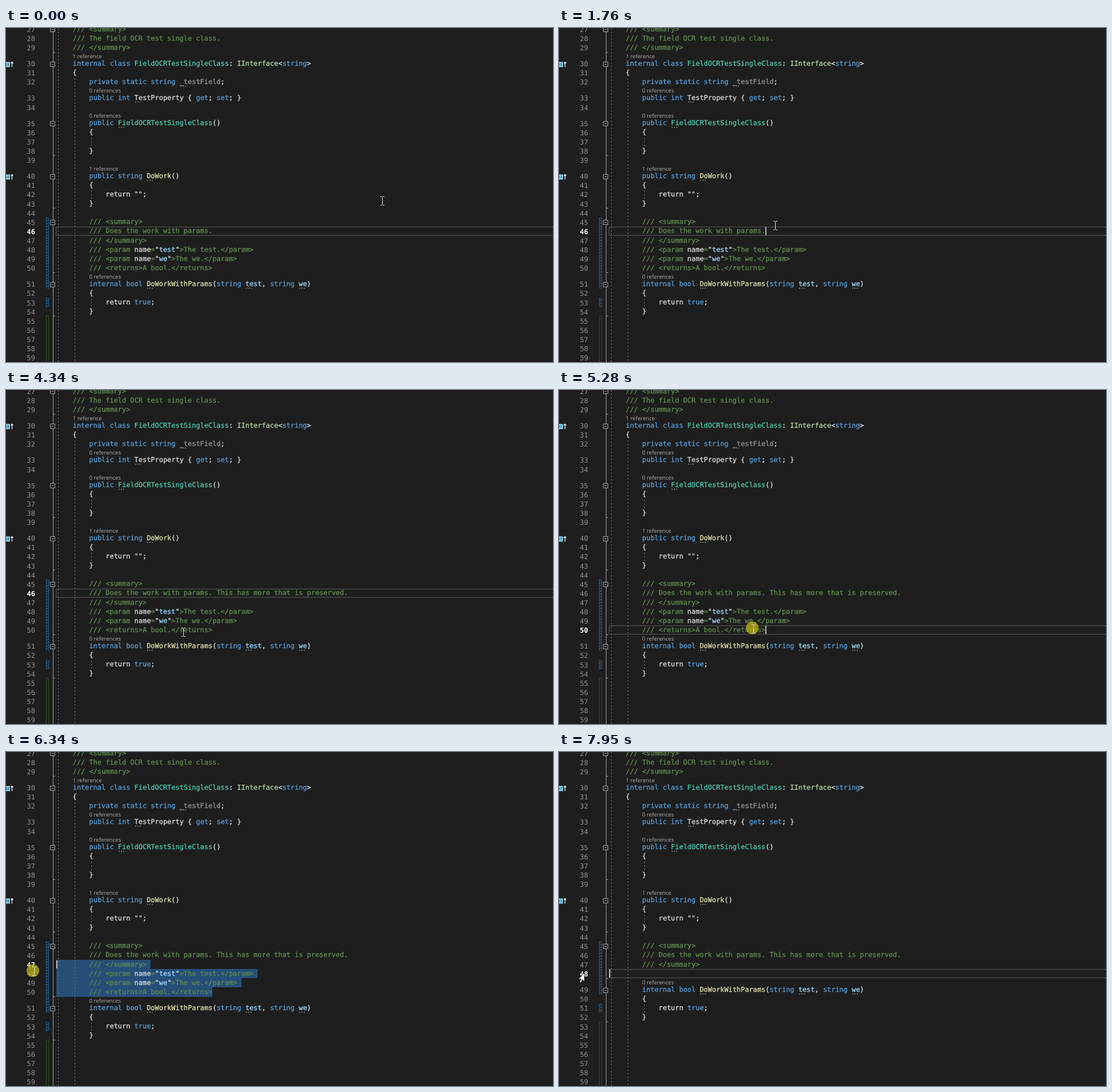
These frames come from a looping animation (957 by 585 pixels, 8000 ms). An HTML page:

```html
<!DOCTYPE html>
<html lang="en">
<head>
<meta charset="utf-8">
<title>Code editor</title>
<style>
  html, body { margin: 0; width: 100%; height: 100%; overflow: hidden; background: #1e1e1e; }
  svg { display: block; width: 100%; height: 100%; }
  text { white-space: pre; text-rendering: geometricPrecision; }
  .code, .num { font: 11.943px "DejaVu Sans Mono", "Liberation Mono", monospace; }
  .code tspan { fill: currentColor; stroke: currentColor; stroke-width: .3; }
  .num { fill: #929292; }
  .num.on { fill: #fff; font-weight: bold; }
  .lens { font: 9.6px "Noto Sans", "Open Sans", sans-serif; fill: #a4a4a4; }
  .p { color: #dcdcdc; }
  .k { color: #569cd6; }
  .t { color: #4ec9b0; }
  .i { color: #b8d7a3; }
  .m { color: #dcdcaa; }
  .v { color: #9cdcfe; }
  .f { color: #949494; }
  .s { color: #d8c5bb; }
  .d, .x { color: #608b4e; }
  .fold { fill: #1e1e1e; stroke: #a5a5a5; }
  .rail { fill: none; stroke: #a0a0a0; }
  .guide { fill: none; stroke: #6c6c6c; stroke-dasharray: 3 3; }
  .dots { fill: none; stroke: #a0a0a0; stroke-width: 1.5; stroke-dasharray: 1.6 2.4; }
  .added { fill: #1e1e1e; stroke: #28551d; }
</style>
</head>
<body>
<svg viewBox="0 0 957 585" preserveAspectRatio="none">
  <defs>
    <pattern id="hatch" x="70" width="5" height="5" patternUnits="userSpaceOnUse">
      <path stroke="#2a80c4" d="M0 5L5 0"/>
      <path stroke="#1d5f96" d="M.5 0V5M4.5 0V5"/>
    </pattern>
  </defs>
  <path id="sel" fill="#264f78" shape-rendering="crispEdges"/>
  <rect id="row" x="87.8" width="880" height="14.8" fill="none" stroke="#464646" stroke-width="1.5"/>
  <g id="pages"></g>
  <path id="caret" stroke="#f0f0f0" stroke-width="1.4"/>
  <circle id="press" r="11" fill="#b8ae12" fill-opacity=".78"/>
  <path id="beam" fill="none" stroke="#e4e4e4" d="M-3.5 -7.5H-.8M.8 -7.5H3.5M0 -7V7M-3.5 7.5H-.8M.8 7.5H3.5"/>
  <path id="arrow" fill="#fff" stroke="#111" stroke-width=".8" d="M0 0V15L3.6 11.8L6 17L8.4 16L6 10.8H10.6Z"/>
</svg>
<script>
const LOOP = 8000, X0 = 88, CW = 7.19, LH = 16.1, LENS = 12, FIRST = 27, LAST = 59;
const PASTE = 2810, DOWN = 5190, DRAG = 5320, UP = 7240, CUT = 7950, LAG = 85, BLINK = 520;
const $ = id => document.getElementById(id);

// Each line: indent, coloured text (~class, ^ = suggestion dots), flags, reference label.
// Flags: f fold box, e end tick, g inner guide, b changed, i interface glyph, n new lines start
const head = [
  [4, '~d/// <summary>', 'f'],
  [4, '~d/// The field OCR test single class.'],
  [4, '~d/// </summary>', 'e'],
  [4, '~kinternal class ~tFieldOCRTestSingleClass~p: ~iIInterface~p<~kstring~p>', 'fi', '1 reference'],
  [4, '~p{'],
  [8, '~kprivate static string ~f^_testField~p;'],
  [8, '~kpublic int ~p^TestProperty { ~kget~p; ~kset~p; }', '', '0 references'],
  [0, ''],
  [8, '~kpublic ~t^FieldOCRTestSingleClass~p()', 'f', '0 references'],
  [8, '~p{'],
  [0, '', 'g'],
  [8, '~p}', 'e'],
  [0, ''],
  [8, '~kpublic string ~m^DoWork~p()', 'fi', '1 reference'],
  [8, '~p{'],
  [12, '~preturn ~s""~p;', 'g'],
  [8, '~p}', 'e'],
  [0, ''],
  [8, '~d/// <summary>', 'fb'],
  [8, '~d/// Does the work with params.~x This has more that is preserved.', 'b'],
  [8, '~d/// </summary>', 'b']
];
const param = (name, note) => [8, `~d/// <param ~pname~d=~p"~v${name}~p"~d>${note}</param>`, 'b'];
const docs = [
  param('test', 'The test.'),
  param('we', 'The we.'),
  [8, '~d/// <returns>A bool.</returns>', 'be']
];
const tail = [
  [8, '~kinternal bool ~m^DoWorkWithParams~p(~kstring ~v^test~p, ~kstring ~v^we~p)', 'fb', '0 references'],
  [8, '~p{'],
  [12, '~preturn ~ktrue~p;', 'gb'],
  [8, '~p}', 'e'],
  [0, '', 'n']
];

function add(parent, tag, attrs, text) {
  const el = document.createElementNS('http://www.w3.org/2000/svg', tag);
  for (const k in attrs) el.setAttribute(k, attrs[k]);
  if (text) el.textContent = text;
  return parent.appendChild(el);
}
const line = (g, name, d) => add(g, 'path', { class: name, d });
const colX = col => X0 + col * CW;
const half = y => Math.floor(y) + .5;

function glyph(g, y) {
  add(g, 'path', { fill: '#86d4f2', d: `M0 ${y - 4}h7v9h-7z` });
  add(g, 'path', { stroke: '#24465a', d: `M1.5 ${y - 2}v5M4.5 ${y - 2}v5` });
  add(g, 'path', { stroke: '#f0f0f0', 'stroke-width': 1.3, fill: 'none', d: `M10.5 ${y + 5}v-9m-2 2.5l2 -2.5l2 2.5` });
}

function codeLine(g, indent, markup, top) {
  const base = Math.round(top + 11.4);
  const text = add(g, 'text', { class: 'code', y: base });
  let col = indent;
  for (const token of markup.split('~').slice(1)) {
    const word = token.slice(1).replace('^', '');
    if (token[1] === '^') line(g, 'dots', `M${Math.round(colX(col)) + 1} ${base + 3.7}h10`);
    add(text, 'tspan', { class: token[0], x: colX(col).toFixed(2) }, word);
    col += word.length;
  }
  return col;
}

function buildPage(lines) {
  const g = add($('pages'), 'g', {}), page = { g, top: {}, end: {}, num: {} };
  line(g, 'guide', 'M91.5 0V585M120.5 88V585');
  line(g, 'rail', 'M82.5 0V585');
  let y = -5.9;
  for (let n = FIRST; n <= LAST; n++) {
    const [indent, markup, flags = '', lens] = lines[n - FIRST] || [0, ''];
    const has = f => flags.includes(f), start = y;
    if (lens) {
      y += LENS;
      add(g, 'text', { class: 'lens', x: colX(indent), y: Math.round(y - 1.4) }, lens);
    }
    const mid = half(y + 8.8), bottom = y + LH;
    if (has('b')) add(g, 'rect', { x: 70, y: start, width: 5, height: bottom - start, fill: 'url(#hatch)' });
    if (has('n')) add(g, 'rect', { class: 'added', x: 70.5, y: half(y), width: 4, height: 120 });
    if (has('e')) line(g, 'rail', `M82.5 ${half(bottom)}h3.5`);
    if (has('g')) line(g, 'guide', `M149.5 ${y + 1}V${bottom}`);
    if (has('f')) {
      line(g, 'fold', `M77.5 ${mid - 4}h8v8h-8z`);
      line(g, 'rail', `M79.5 ${mid}h4`);
    }
    if (has('i')) glyph(g, mid);
    page.num[n] = add(g, 'text', { class: 'num', x: 36.6, y: Math.round(y + 12.8) }, String(n));
    page.end[n] = codeLine(g, indent, markup, y);
    page.top[n] = y;
    y = bottom;
  }
  return page;
}

const before = buildPage([...head, ...docs, ...tail]);
const after = buildPage([...head, [0, '', 'be'], ...tail]);
const extra = document.querySelectorAll('.x');
const BOTTOM = 50, blinkStarts = [1520, 2630, 6490];

// Pointer moves: start, end, and where it arrives
const moves = [
  [0, 30, 653.5, 302.5],
  [180, 660, 423.5, 345.5],
  [780, 1050, 391.5, 351.5],
  [1050, 1110, 378.5, 351.5],
  [1670, 1760, 378.5, 345.5],
  [3120, 3330, 384, 323.5],
  [3850, 4340, 310.5, 424],
  [4460, 4530, 368, 422],
  [4670, 4850, 364.5, 421],
  [DOWN, 5730, 49.5, 376],
  [6330, 6340, 49.5, 384],
  [6700, 6710, 44.5, 388]
];

function pointer(t) {
  let x = 659, y = 302.5;
  for (const [from, to, mx, my] of moves) {
    if (t < from) break;
    const p = Math.min(1, (t - from) / (to - from)), ease = p * p * (3 - 2 * p);
    x += (mx - x) * ease;
    y += (my - y) * ease;
  }
  return [x, y];
}

// The text caret trails the pointer while dragging
function caretAt(t) {
  if (t < DOWN) return [46, t < PASTE ? 38 : before.end[46]];
  const [x, y] = pointer(t - LAG);
  let n = BOTTOM;
  while (y < before.top[n]) n--;
  const col = Math.round((x - X0) / CW);
  return [n, Math.max(0, Math.min(col, before.end[n]))];
}

function caretLit(t) {
  const since = blinkStarts.filter(b => b <= t).pop();
  const dragging = t >= DOWN && t < 6400;
  return dragging || (t - since) % (2 * BLINK) < BLINK;
}

function selection(first, col) {
  let d = '';
  for (let n = first; n <= BOTTOM; n++) {
    const left = colX(n === first ? col : 0);
    const right = colX(before.end[n] + (n < BOTTOM ? 1 : 0));
    d += `M${left} ${before.top[n]}H${right}v${LH}H${left}z`;
  }
  return d;
}

const show = (el, on) => el.setAttribute('visibility', on ? 'visible' : 'hidden');
const place = (el, x, y, more = '') => el.setAttribute('transform', `translate(${x} ${y})${more}`);

function render(t) {
  const cut = t >= CUT, page = cut ? after : before;
  const [row, col] = caretAt(t), top = page.top[row];
  const selecting = !cut && t >= DRAG;

  before.g.style.display = cut ? 'none' : '';
  after.g.style.display = cut ? '' : 'none';
  for (const el of extra) show(el, t >= PASTE);
  for (const n in page.num) page.num[n].classList.toggle('on', +n === row);

  $('sel').setAttribute('d', selecting ? selection(row, col) : '');
  $('row').setAttribute('y', top + .5);
  show($('row'), !selecting);
  $('caret').setAttribute('d', `M${colX(col) + .8} ${top + .3}v14.7`);
  show($('caret'), caretLit(t));

  const [x, y] = pointer(t), inMargin = t >= UP;
  place($('press'), x - 2.5, y - 1);
  show($('press'), (t >= 1270 && t < 1360) || (t >= DOWN && t < UP));
  place($('beam'), half(x), Math.round(y));
  show($('beam'), !inMargin);
  place($('arrow'), x, y - 1, t < UP + 30 ? '' : ' scale(-1 1)');
  show($('arrow'), inMargin);
}

const start = performance.now();
function tick() {
  render((performance.now() - start) % LOOP);
  requestAnimationFrame(tick);
}
tick();
</script>
</body>
</html>
```
